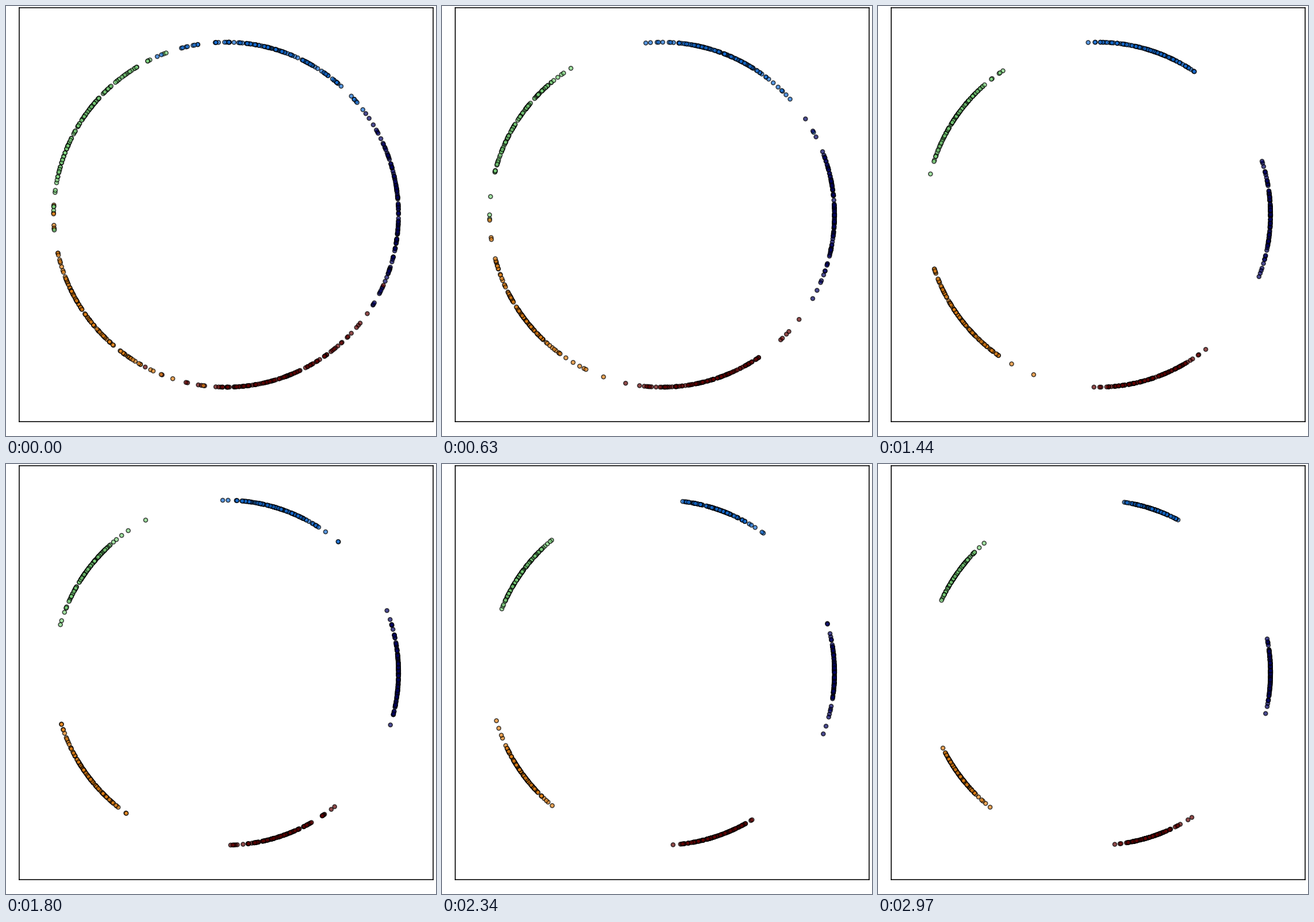
A matplotlib script for the animation above (3060 ms loop, 748 by 748 pixels).

```python
import numpy as np
import matplotlib.pyplot as plt
from matplotlib.animation import FuncAnimation

SIZE, DPI = 748, 100
TICKS, TICK_MS = 34, 90
HELD = (1, 12, 21, 31)          # ticks that repeat the previous sample
GROUPS, PER_GROUP = 5, 115
SPREAD, DECAY = 16, 0.0405      # degrees, shrink rate per step
COLORS = np.array([(0, 0, 100), (20, 110, 215), (125, 215, 125),
                   (230, 130, 20), (100, 0, 0)]) / 255


def px(n):
    """Pixels to points."""
    return n * 72 / DPI


def sample(step):
    """Fresh points on the unit circle around five means, tighter each step."""
    rng = np.random.default_rng(100 + step)
    sigma = SPREAD * np.exp(-DECAY * step)
    dev = rng.normal(0, sigma, (PER_GROUP, GROUPS))
    angle = np.radians(dev + 360 / GROUPS * np.arange(GROUPS)).ravel()
    return np.column_stack([np.cos(angle), np.sin(angle)])


fig = plt.figure(figsize=(SIZE / DPI, SIZE / DPI), dpi=DPI, facecolor="white")
ax = fig.add_axes([22.8 / SIZE, (SIZE - 723) / SIZE, 720 / SIZE, 720 / SIZE])
ax.set(xlim=(-1.2, 1.2), ylim=(-1.2, 1.2), xticks=[], yticks=[])
for spine in ax.spines.values():
    spine.set_linewidth(px(1.6))

dots = ax.scatter(*sample(0).T, s=px(7) ** 2, c=np.tile(COLORS, (PER_GROUP, 1)),
                  edgecolors="black", linewidths=px(1.6), alpha=0.7)


def update(tick):
    step = tick - sum(h <= tick for h in HELD)
    dots.set_offsets(sample(step))
    return dots,


anim = FuncAnimation(fig, update, frames=TICKS, interval=TICK_MS,
                     repeat=True, repeat_delay=0)
plt.show()
```
